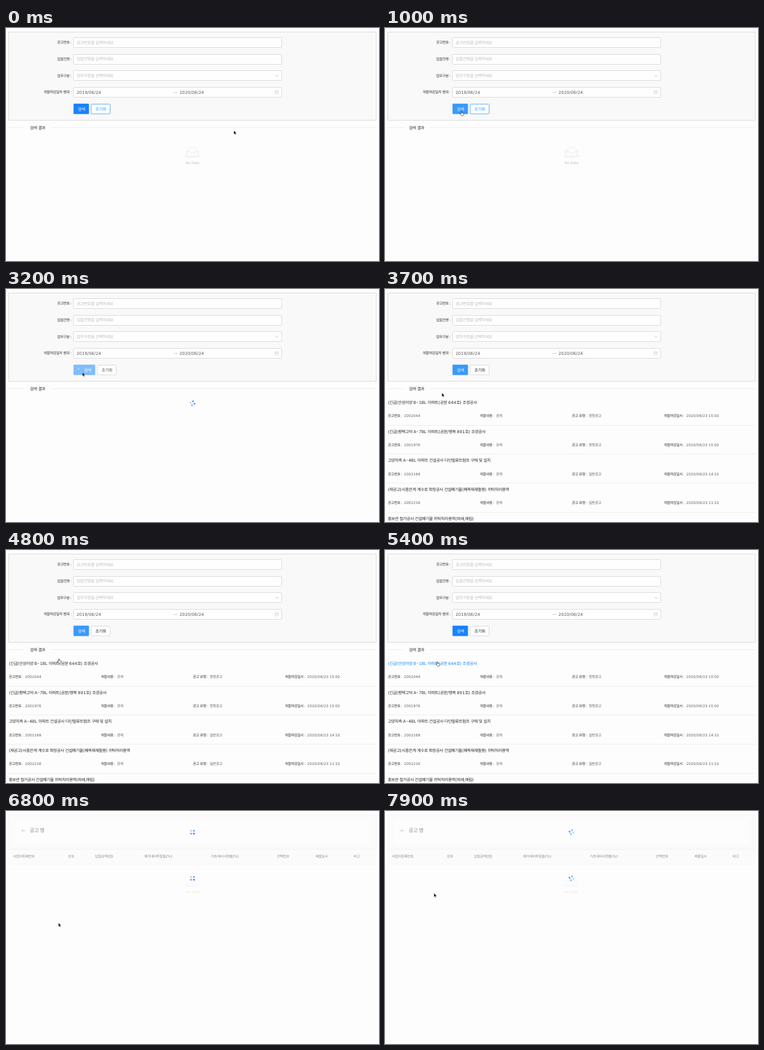
Recreate the animation shown at these times as an HTML page. Size 600 px wide and 375 px high, loop 8000 ms.

```html
<!DOCTYPE html>
<html>
<head>
<meta charset="utf-8">
<title>입찰 검색</title>
<style>
  html, body { margin: 0; width: 100%; height: 100%; overflow: hidden; background: #fdfdfd; }
  svg { display: block; width: 100%; height: 100%; }
  text {
    font-family: Inter, "Noto Sans CJK KR", "Noto Sans CJK", sans-serif;
    font-feature-settings: "tnum";
    text-rendering: geometricPrecision;
    white-space: pre;
  }
  .ko { letter-spacing: -.06em; }
</style>
</head>
<body>
<svg id="stage" viewBox="0 0 600 375" xmlns="http://www.w3.org/2000/svg"></svg>
<script>
const LOOP = 8000, STEP = 100;
const LOAD = 1950, DONE = 3350, OPEN = 5450;
const UNIT = 5 / 12; // page pixel to stage pixel
const LARGE = 16 * UNIT, SMALL = 14 * UNIT;
const INK = '#2c2c2c', BODY = '#5c5c5c', HINT = '#bfbfbf', EDGE = '#dcdcdc';
const BLUE = [27, 130, 251], LIGHT = [59, 153, 251], DEEP = [16, 105, 214];
const DARK = [44, 44, 44], GREY = [92, 92, 92], LINE = [220, 220, 220], SOFT = [100, 175, 251];

// Text centred vertically on y; Hangul runs are set tighter than Latin
function text(x, y, str, size, fill, extra = '') {
  const runs = str.replace(/[가-힣]+/g, '<tspan class="ko">$&</tspan>');
  return `<text x="${x}" y="${y + size * .36}" font-size="${size}" fill="${fill}" ${extra}>${runs}</text>`;
}
const rect = (x, y, w, h, fill, stroke, extra = '') =>
  `<rect x="${x}" y="${y}" width="${w}" height="${h}" fill="${fill}" stroke="${stroke}" ${extra}/>`;
const line = (x1, x2, y, color) => `<path d="M${x1} ${y}H${x2}" stroke="${color}"/>`;
const icon = (d, color, width = .6) =>
  `<path d="${d}" fill="none" stroke="${color}" stroke-width="${width}"/>`;

const MIDDLE = 'text-anchor="middle"';
const END = 'text-anchor="end"';

function empty(y, id, opacity) {
  return `<g id="${id}" opacity="${opacity}">
    <g transform="translate(286.7 ${y}) scale(${UNIT}) translate(0 1)">
      <ellipse fill="#f5f5f5" cx="32" cy="33" rx="32" ry="7"/>
      <g stroke="#d9d9d9" fill="#fdfdfd">
        <path d="M55 12.8L44.9 1.3Q44 0 42.9 0H21.1Q20 0 19.1 1.3L9 12.8V22H55Z"/>
        <path fill="#fafafa" d="M41.6 15.9C41.6 14.3 42.6 13 43.8 13H55V31.1C55 33.3 53.7 35 52 35H12C10.3 35 9 33.3 9 31.1V13H20.2C21.4 13 22.4 14.3 22.4 15.9C22.4 17.5 23.4 18.9 24.6 18.9H39.4C40.6 18.9 41.6 17.5 41.6 15.9Z"/>
      </g>
    </g>
    ${text(300, y + 25, 'No Data', SMALL, HINT, MIDDLE)}
  </g>`;
}

function spinner(x, y, id) {
  const d = 5.5 * UNIT;
  const dots = [[-d, -d], [d, -d], [d, d], [-d, d]]
    .map(([cx, cy]) => `<circle cx="${cx}" cy="${cy}" r="1.42"/>`).join('');
  return `<g transform="translate(${x} ${y})"><g id="${id}" fill="rgb(${BLUE})">${dots}</g></g>`;
}

function field(row, label, hint) {
  const y = 23.2 + row * 26.7, top = Math.round(y - 8.2) + .5;
  return text(105.4, y, label + ' :', SMALL, INK, END) +
    rect(108.5, top, 335, 16, '#fefefe', EDGE, 'rx="1"') +
    text(113.5, y, hint, LARGE, HINT);
}

const notices = [
  ['(긴급)안성아양 B-1BL 아파트(공분 644호) 조경공사', '2002044', '정정공고', '15:00'],
  ['(긴급)평택고덕 A-7BL 아파트(공분/행복 891호) 조경공사', '2001976', '정정공고', '15:00'],
  ['고양지축 A-4BL 아파트 건설공사 다단벌류트펌프 구매 및 설치', '2002168', '일반공고', '14:10'],
  ['(재공고)시흥은계 계수로 확장공사 건설폐기물(폐목재재활용) 위탁처리용역', '2002216', '일반공고', '11:10'],
  ['홍보관 철거공사 건설폐기물 위탁처리용역(파쇄,매립)', '2002205', '일반공고', '11:00']
];

function notice([title, no, kind, hour], i) {
  const y = 182.6 + i * 46.67, low = y + 21.6;
  const pair = (x, label, gap, value) =>
    text(x, low, label + ' :', SMALL, INK) + text(x + gap, low, value, SMALL, BODY);
  return text(4.4, y, title, LARGE, INK, i ? '' : 'id="link"') +
    pair(4.4, '공고번호', 26, no) +
    pair(152.4, '개찰내용', 26, '공개') +
    pair(300.4, '공고 유형', 27.4, kind) +
    pair(448.4, '개찰마감일시', 36, '2020/06/23 ' + hour) +
    line(4, 596, Math.floor(y + 36.6) + .5, '#efefef');
}

const columns = [
  [11, '사업자등록번호'], [99.5, '상호'], [143, '입찰금액(원)'], [222, '예가대비투찰율(%)'],
  [329, '기초대비사정률(%)'], [435.5, '선택번호'], [497.5, '제출일시'], [559, '비고']
];

const searchPage = `<g id="search">
  ${rect(4.5, 6.5, 591, 142, '#f9f9f9', EDGE)}
  ${field(0, '공고번호', '공고번호를 입력하세요')}
  ${field(1, '입찰건명', '입찰건명을 입력하세요')}
  ${field(2, '업무구분', '업무구분을 선택하세요')}
  ${field(3, '개찰마감일자 범위', '')}
  ${icon('M433.6 75.3L436 78.2L438.4 75.3', HINT, .7)}
  ${text(113.5, 103.3, '2019/06/24', LARGE, '#555')}
  ${text(279, 103.3, '2020/06/24', LARGE, '#555')}
  ${icon('M269.6 103.8H275.2L273.6 102.5', '#b5b5b5')}
  ${icon('M433 101.4H438V106H433ZM433 103.1H438M434.3 100.5V102M436.7 100.5V102', HINT, .5)}
  <rect id="wave" fill="none" stroke="rgb(${BLUE})"/>
  <rect id="find" x="108.6" y="121.8" height="16.7" rx="1"/>
  <g id="arc"><path d="M0 -2.6A2.6 2.6 0 0 1 2.6 0" fill="none" stroke="#fff" stroke-width=".6"/></g>
  <g id="findText">${text(0, 130.1, '검색', LARGE, '#fff', MIDDLE)}</g>
  <g id="reset">
    <rect x="0" y="122.5" width="30.5" height="15.7" rx="1" fill="#fefefe"/>
    ${text(15.4, 130.1, '초기화', LARGE, 'currentColor', MIDDLE)}
  </g>
  ${line(4, 29, 160.5, '#eee')}${line(73, 596, 160.5, '#eee')}
  ${text(38.4, 160.3, '검색 결과', LARGE, INK, 'font-weight="500"')}
  ${empty(192, 'noData', 1)}
  ${spinner(300, 183.8, 'spin0')}
  <g id="list">${notices.map(notice).join('')}</g>
</g>`;

const detailPage = `<g id="detail">
  ${rect(4.5, 6.5, 591, 55, '#fbfbfb', '#f5f5f5')}
  ${rect(15, 15, 570, 38, '#fdfdfd', 'none')}
  ${icon('M31 31.5H25.4M28 29L25.4 31.5L28 34', '#b0b0b0')}
  ${text(38, 31.4, '공고 명', 20 * UNIT, '#8f8f8f', 'font-weight="500"')}
  ${rect(4, 62, 592, 23, '#fbfbfb', 'none')}
  ${line(4, 596, 61.5, '#f1f1f1')}${line(4, 596, 85.5, '#f7f7f7')}
  ${columns.map(([x, s]) => text(x, 73.2, s, SMALL, '#929292', 'font-weight="500"')).join('')}
  ${empty(105, 'noRows', .35)}
  ${spinner(300, 34.2, 'spin1')}
  ${spinner(300, 108.4, 'spin2')}
</g>`;

const pointers = `<g id="pointer">
  <path id="arrow" d="M0 0V6.2L1.4 4.9L2.3 7L3.4 6.6L2.5 4.5L4.4 4.4Z" fill="#000" stroke="#fff" stroke-width=".4"/>
  <path id="hand" d="M-.6 .6q0 -.8 .7 -.8t.7 .8v1.9l2.2 .4q.9 .2 .8 1.1l-.3 1.6q-.1 .9 -.8 1.2h-2.6q-.6 -.2 -.9 -.8l-1.4 -2q-.4 -.7 .3 -.9q.5 -.1 1.3 .8z" fill="#fff" stroke="#111" stroke-width=".6"/>
</g>`;

const stage = document.getElementById('stage');
stage.innerHTML = rect(0, 0, 600, 375, '#fdfdfd', 'none') + searchPage + detailPage + pointers;
const parts = {};
stage.querySelectorAll('[id]').forEach(el => parts[el.id] = el);

const set = (el, attrs) => { for (const k in attrs) el.setAttribute(k, attrs[k]); };
const show = (el, on) => { el.style.display = on ? '' : 'none'; };
const ease = u => u < .5 ? 4 * u ** 3 : 1 - 4 * (1 - u) ** 3;
const ramp = (t, start, span = 300) => Math.min(1, Math.max(0, (t - start) / span));
const mix = (a, b, p) => a.map((v, i) => v + (b[i] - v) * p);
const rgb = c => `rgb(${c.map(Math.round)})`;

// Colour after a series of eased changes: [start, colour]
const blend = (t, color, ...changes) =>
  rgb(changes.reduce((c, [start, next]) => mix(c, next, ease(ramp(t, start))), color));

const path = [
  [50, 366.5, 165], [900, 123, 134.2], [3300, 123, 134.2], [3700, 91.5, 167.2],
  [3900, 91, 170], [4150, 91, 170], [4600, 85.3, 174.5], [4700, 85.3, 174.5],
  [5000, 84.4, 180], [6900, 84.4, 180], [7400, 83.4, 177], [7900, 78.8, 132.3]
];

function pointerAt(t) {
  let pos = path[0].slice(1);
  for (let i = 1; i < path.length; i++) {
    const start = path[i - 1][0];
    pos = mix(pos, path[i].slice(1), ease(ramp(t, start, path[i][0] - start)));
  }
  return pos;
}

function spin(el, ms) {
  set(el, { transform: `rotate(${45 + ms * .3})` });
  [...el.children].forEach((dot, i) => {
    const s = Math.max(0, ms / 1000 - i * .4) % 2;
    set(dot, { opacity: .3 + .7 * (s < 1 ? s : 2 - s) });
  });
}

function drawButtons(t) {
  const busy = t >= LOAD && t < DONE;
  const pad = ease(ramp(t, LOAD)) - ease(ramp(t, DONE));
  const width = 24.9 + (busy ? 10 * UNIT : 0) + pad * 14 * UNIT;
  const right = 108.6 + width;
  const veil = .35 * (ramp(t, LOAD, 200) - ramp(t, DONE, 200));
  const fill = blend(t, BLUE, [700, LIGHT], [1700, DEEP], [LOAD, LIGHT], [5100, BLUE]);
  const base = fill.match(/\d+/g).map(Number);
  set(parts.find, { width, fill: rgb(mix(base, [255, 255, 255], veil)) });
  set(parts.findText, { transform: `translate(${right - 12.3})` });

  show(parts.arc, busy);
  const iconX = 108.6 + 6.25 + pad * 14 * UNIT - 14 * UNIT + 3.3;
  set(parts.arc, { transform: `translate(${iconX} 130.2) rotate(${(t - 2450) * .36})` });

  set(parts.reset, {
    transform: `translate(${right + 3.5})`,
    color: blend(t, LIGHT, [1700, t > DONE ? DARK : GREY])
  });
  set(parts.reset.firstElementChild, { stroke: blend(t, SOFT, [1700, LINE]) });

  const age = ramp(t, LOAD, 2000), grow = 2.5 * (1 - (1 - ramp(t, LOAD, 400)) ** 3);
  show(parts.wave, t >= LOAD && age < 1);
  set(parts.wave, {
    x: 108.6 - grow / 2, y: 121.8 - grow / 2, rx: 1,
    width: width + grow, height: 16.7 + grow,
    'stroke-width': grow, opacity: .2 * (1 - age) ** 4
  });
}

function draw(t) {
  const open = t >= OPEN;
  show(parts.search, !open);
  show(parts.detail, open);

  drawButtons(t);
  show(parts.noData, t < LOAD);
  show(parts.spin0, t >= LOAD && t < DONE);
  spin(parts.spin0, t - LOAD);
  show(parts.list, t >= DONE);
  set(parts.list, { opacity: .5 + .5 * ramp(t, DONE) });
  set(parts.link, { fill: blend(t, DARK, [4750, BLUE]) });
  spin(parts.spin1, t - OPEN);
  spin(parts.spin2, t - OPEN);

  const hand = (t >= 720 && t < LOAD) || (t >= 4800 && t < 5750);
  show(parts.hand, hand);
  show(parts.arrow, !hand);
  set(parts.pointer, { transform: `translate(${pointerAt(t)})` });
}

function tick() {
  const t = performance.now() % LOOP;
  draw(Math.floor(t / STEP) * STEP);
  requestAnimationFrame(tick);
}
tick();
</script>
</body>
</html>
```
